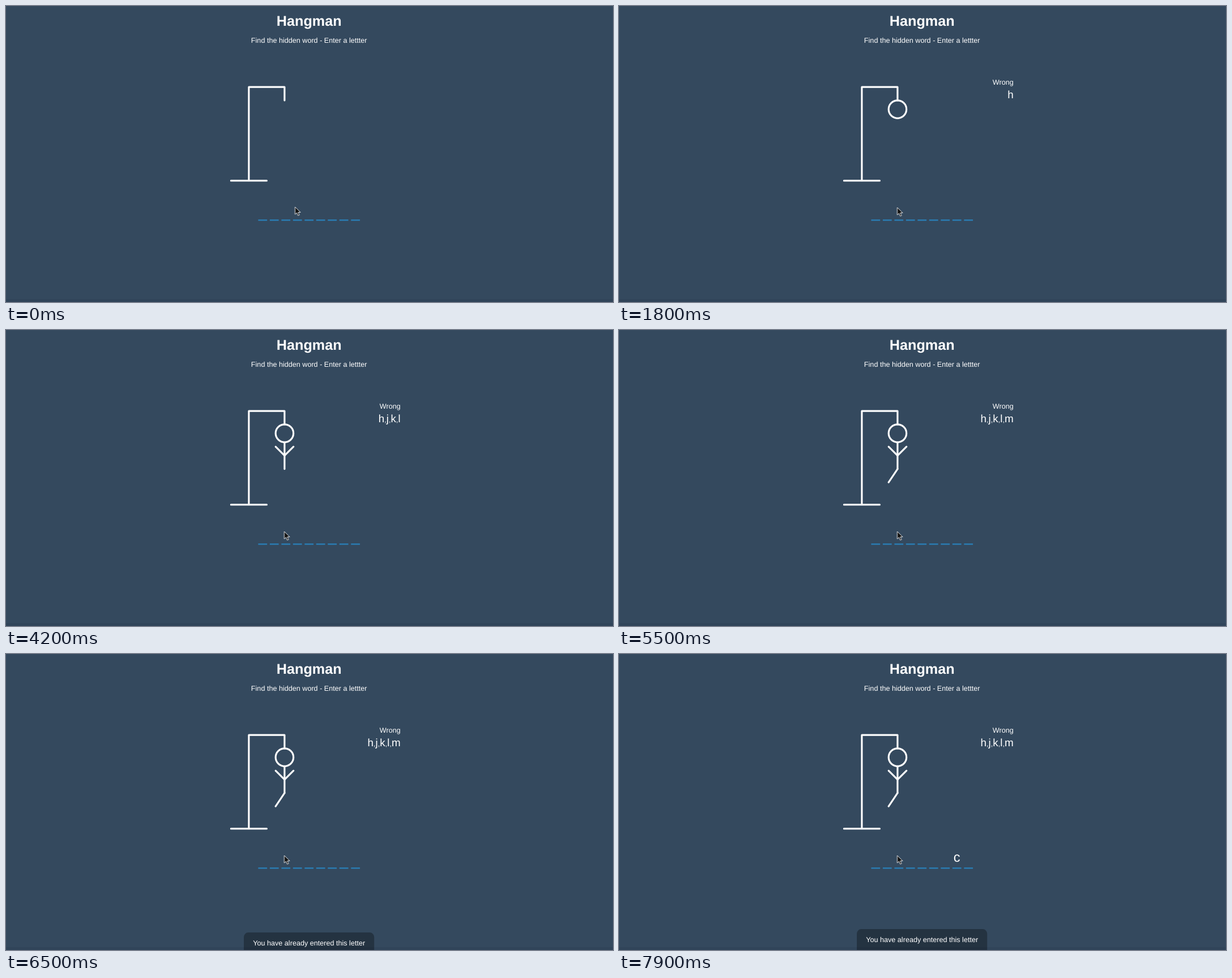
Animation, 1072 px wide and 523 px high, one loop 8000 ms. Source, as an HTML page:

```html
<!DOCTYPE html>
<html lang="en">
<head>
<meta charset="utf-8">
<title>Hangman</title>
<style>
html, body { margin: 0; width: 100%; height: 100%; overflow: hidden; background: #34495e; }
svg { display: block; }
text {
  font: 12.61px "Liberation Sans", Arial, sans-serif;
  fill: #fff;
  text-anchor: middle;
  text-rendering: geometricPrecision;
}
.title { font-size: 25.22px; font-weight: bold; }
.wrong { text-anchor: end; }
.guesses { font-size: 18.91px; }
.comma { font-size: .667em; }
.slot { font-size: 23.64px; }
.figure { fill: none; stroke: #fff; stroke-width: 4; stroke-linecap: round; }

.k1, .k2, .k3, .k4, .k5, .hit, .toast, .cursor {
  animation: 8s step-end infinite;
}
.k1 { animation-name: k1; }
.k2 { animation-name: k2; }
.k3 { animation-name: k3; }
.k4 { animation-name: k4; }
.k5 { animation-name: k5; }
.hit { animation-name: hit; }
.toast { animation-name: toast; }
.cursor { animation-name: cursor; }

/* The zero font size lets the right-aligned guesses grow to the left. */
@keyframes k1 {
  0% { visibility: hidden; }
  22.5%, to { visibility: visible; }
}
@keyframes k2 {
  0% { visibility: hidden; font-size: 0; }
  32.5%, to { visibility: visible; font-size: 1em; }
}
@keyframes k3 {
  0% { visibility: hidden; font-size: 0; }
  42.5%, to { visibility: visible; font-size: 1em; }
}
@keyframes k4 {
  0% { visibility: hidden; font-size: 0; }
  52.5%, to { visibility: visible; font-size: 1em; }
}
@keyframes k5 {
  0% { visibility: hidden; font-size: 0; }
  68.75%, to { visibility: visible; font-size: 1em; }
}
@keyframes hit {
  0% { visibility: hidden; }
  98.75%, to { visibility: visible; }
}
@keyframes toast {
  0% { transform: translateY(40px); }
  80% { transform: translateY(26.8px); }
  81.25% { transform: translateY(6px); }
  82.5%, to { transform: none; }
}
@keyframes cursor {
  0% { transform: translate(510.5px, 355px); }
  2.5% { transform: translate(503px, 355.6px); }
  3.75% { transform: translate(496.5px, 356.2px); }
  5% { transform: translate(493.3px, 356.5px); }
  11.25%, to { transform: translate(491.4px, 356px); }
}
</style>
</head>
<body>
<svg width="1072" height="523" viewBox="0 0 1072 523">
  <rect width="1072" height="523" fill="#34495e"/>
  <rect y="518" width="1072" height="5" fill="#304459"/>

  <text class="title" x="535.2" y="35.4">Hangman</text>
  <text x="535.2" y="65.4">Find the hidden word - Enter a lettter</text>

  <g class="figure" transform="translate(381.6 127.4) scale(.788)">
    <path d="M60 20H140M140 20V50M60 20V230M20 230H100"/>
    <circle class="k1" cx="140" cy="70" r="20"/>
    <path class="k2" d="M140 90V150"/>
    <path class="k3" d="M140 120L120 100"/>
    <path class="k4" d="M140 120L160 100"/>
    <path class="k5" d="M140 150L120 180"/>
  </g>

  <text class="wrong k1" x="696.7" y="138.7">Wrong</text>
  <text class="wrong guesses" x="696.7" y="163.3"><tspan class="k1">h</tspan><tspan class="k2"><tspan class="comma">,</tspan>j</tspan><tspan class="k3"><tspan class="comma">,</tspan>k</tspan><tspan class="k4"><tspan class="comma">,</tspan>l</tspan><tspan class="k5"><tspan class="comma">,</tspan>m</tspan></text>

  <path d="M445.4 378.35h180" stroke="#2980b9" stroke-width="2.36" stroke-dasharray="15.76 4.73"/>
  <text class="slot hit" x="596.7" y="366.6">c</text>

  <g class="toast">
    <path d="M420 526V494a7.9 7.9 0 0 1 7.9-7.9H642.3a7.9 7.9 0 0 1 7.9 7.9V526z" fill="#000" fill-opacity=".3"/>
    <text x="535.2" y="509">You have already entered this letter</text>
  </g>

  <path class="cursor" d="M0 0V13.2L3 10.4L5.2 15.3L7.6 14.3L5.4 9.6H9.6Z" fill="#111" stroke="#fff" stroke-width=".9"/>
</svg>
</body>
</html>
```
